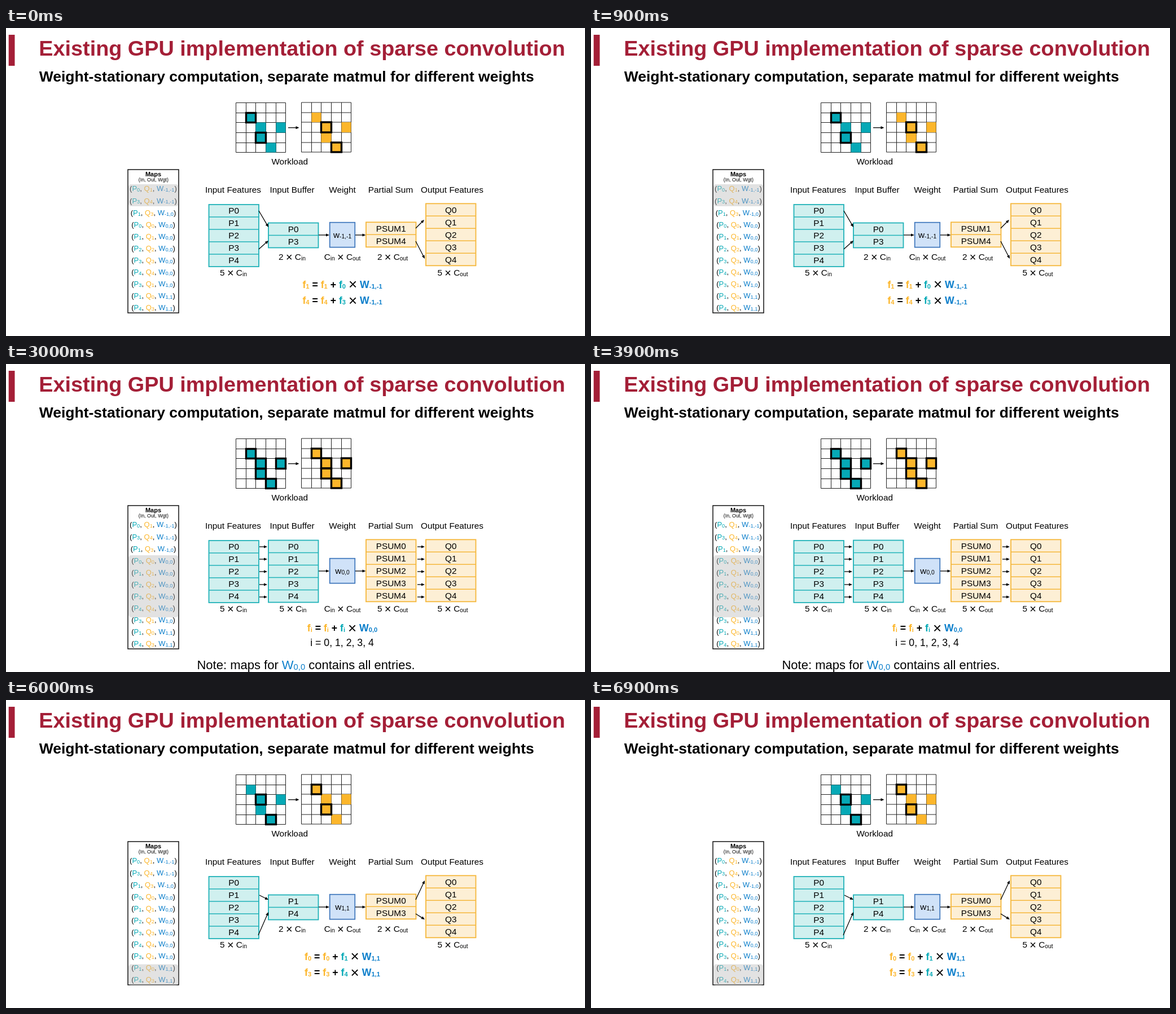
An HTML page with a canvas that plays this animation: 1026 px wide and 546 px high, repeating every 7.5 s.

```html
<!DOCTYPE html>
<html lang="en">
<head>
<meta charset="utf-8">
<title>Sparse convolution</title>
<style>
html, body { margin: 0; width: 100%; height: 100%; overflow: hidden; background: #fff; }
canvas { display: block; }
</style>
</head>
<body>
<canvas id="stage" width="1026" height="546"></canvas>
<script>
const ctx = document.getElementById('stage').getContext('2d');
const FAMILY = '"Liberation Sans", Arial, sans-serif';
const RED = '#a41f37', BLACK = '#000', TEAL = '#06a9b6', ORANGE = '#fcb62b', BLUE = '#0c7fcb';
const TEAL_BOX = { fill: '#d0f0ef', line: '#20b2b8' };
const ORANGE_BOX = { fill: '#fdefd5', line: '#f5b73b' };
const BLUE_BOX = { fill: '#d0e2f8', line: '#3c75bb' };
const LABEL = 15.36;
const ROW = 22;
const STEP_MS = 1500;

// Cell positions of the five points: [column, row]
const POINTS = [[1, 1], [2, 2], [4, 2], [2, 3], [3, 4]];

// Each map entry: [input, output, weight]
const MAPS = [
  [0, 1, '-1,-1'], [3, 4, '-1,-1'], [1, 3, '-1,0'],
  [0, 0, '0,0'], [1, 1, '0,0'], [2, 2, '0,0'], [3, 3, '0,0'], [4, 4, '0,0'],
  [3, 1, '1,0'], [1, 0, '1,1'], [4, 3, '1,1']
];

const rows = [324, 346, 368, 391, 413];
const STEPS = [
  { from: 0, to: 2, shade: [277, 316],
    arrows: [[448, 324, 465, 353], [448, 392, 465, 377], [726, 355, 741, 340], [726, 378, 742, 409]] },
  { from: 2, to: 3, shade: [317.5, 338],
    arrows: [[447, 343, 466, 354], [727, 378, 746, 388]] },
  { from: 3, to: 8, shade: [339, 449],
    arrows: rows.flatMap(y => [[449, y, 463, y], [729, y, 742, y]]) },
  { from: 8, to: 9, shade: [443.5, 464],
    arrows: [[447, 391, 466, 366], [727, 355, 742, 340]] },
  { from: 9, to: 11, shade: [468.5, 506],
    arrows: [[449, 346, 465, 354], [447, 417, 465, 376], [726, 354, 742, 320], [726, 379, 742, 389]] }
];

function text(str, x, y, size, { bold = false, color = BLACK, align = 'center' } = {}) {
  ctx.font = `${bold ? 'bold ' : ''}${size}px ${FAMILY}`;
  ctx.fillStyle = color;
  ctx.textAlign = align;
  ctx.fillText(str, x, y);
}

// Runs are [string, color, role]; role is 'sub', 'times' or empty.
const plain = str => [str, BLACK];
const times = ['×', BLACK, 'times'];
const indexed = (name, index, color) => [[name, color], [String(index), color, 'sub']];

function rich(runs, cx, y, size, { bold = false, sub = 0.67, cross = 1.3 } = {}) {
  const scale = { sub, times: cross };
  const parts = runs.map(([str, color, role]) => {
    const px = size * (scale[role] || 1);
    const heavy = bold && role !== 'times';
    ctx.font = `${heavy ? 'bold ' : ''}${px}px ${FAMILY}`;
    const drop = role === 'sub' ? size * 0.07 : role === 'times' ? (px - size) * 0.34 : 0;
    return { str, color, px, heavy, drop, width: ctx.measureText(str).width };
  });
  let x = cx - parts.reduce((sum, p) => sum + p.width, 0) / 2;
  for (const p of parts) {
    text(p.str, x, y + p.drop, p.px, { bold: p.heavy, color: p.color, align: 'left' });
    x += p.width;
  }
}

function line(x1, y1, x2, y2, color, width) {
  ctx.strokeStyle = color;
  ctx.lineWidth = width;
  ctx.beginPath();
  ctx.moveTo(x1, y1);
  ctx.lineTo(x2, y2);
  ctx.stroke();
}

function box(x, y, width, height, { fill, line }, weight) {
  ctx.fillStyle = fill;
  ctx.fillRect(x, y, width, height);
  ctx.strokeStyle = line;
  ctx.lineWidth = weight;
  ctx.strokeRect(x, y, width, height);
}

function arrow(x1, y1, x2, y2) {
  const head = 6, half = 2.6;
  const length = Math.hypot(x2 - x1, y2 - y1);
  ctx.save();
  ctx.translate(x1, y1);
  ctx.rotate(Math.atan2(y2 - y1, x2 - x1));
  line(0, 0, length - head + 1, 0, BLACK, 1.3);
  ctx.fillStyle = BLACK;
  ctx.beginPath();
  ctx.moveTo(length, 0);
  ctx.lineTo(length - head, -half);
  ctx.lineTo(length - head, half);
  ctx.fill();
  ctx.restore();
}

function table(x, y, width, names, style) {
  box(x, y, width, names.length * ROW, style, 1.8);
  names.forEach((name, i) => {
    if (i) line(x, y + i * ROW, x + width, y + i * ROW, style.line, 1.5);
    text(name, x + width / 2, y + i * ROW + 16.3, LABEL);
  });
}

function grid(x, y, color, active) {
  const edge = i => Math.round(i * 17.65);
  for (let i = 0; i <= 5; i++) {
    line(x + edge(i), y, x + edge(i), y + edge(5), '#222', 1);
    line(x, y + edge(i), x + edge(5), y + edge(i), '#222', 1);
  }
  const cell = ([c, r]) => [x + edge(c), y + edge(r), edge(c + 1) - edge(c), edge(r + 1) - edge(r)];
  ctx.fillStyle = color;
  for (const point of POINTS) ctx.fillRect(...cell(point));
  ctx.strokeStyle = BLACK;
  ctx.lineWidth = 3.4;
  for (const i of active) ctx.strokeRect(...cell(POINTS[i]));
}

function mapList([top, bottom]) {
  ctx.strokeStyle = '#111';
  ctx.lineWidth = 1.5;
  ctx.strokeRect(216, 251, 90, 254);
  text('Maps', 261, 263, 11, { bold: true });
  text('(In, Out, Wgt)', 261.3, 271.7, 8.85);
  MAPS.forEach(([p, q, w], i) => {
    rich([plain('('), ...indexed('P', p, TEAL), plain(', '), ...indexed('Q', q, ORANGE),
      plain(', '), ...indexed('W', w, BLUE), plain(')')], 261, 289.4 + i * 21.1, 13, { sub: 0.72 });
  });
  ctx.fillStyle = 'rgba(182, 182, 182, 0.4)';
  ctx.beginPath();
  ctx.roundRect(217, top, 88.5, bottom - top, 5);
  ctx.fill();
}

function formulas(entries) {
  const style = { bold: true, sub: 0.63, cross: 1.47 };
  const formula = ([p, q, w], y) => rich([
    ...indexed('f', q, ORANGE), plain(' = '), ...indexed('f', q, ORANGE), plain(' + '),
    ...indexed('f', p, TEAL), plain(' '), times, plain(' '), ...indexed('W', w, BLUE)
  ], 596, y, 17.7, style);
  if (entries.length < 5) {
    entries.forEach((entry, i) => formula(entry, 460.5 + i * 28.6));
    return;
  }
  formula(['i', 'i', '0,0'], 474);
  text('i = 0, 1, 2, 3, 4', 595.5, 500, 17.7);
  rich([plain('Note: maps for '), ...indexed('W', '0,0', BLUE), plain(' contains all entries.')],
    531.5, 540.5, 22);
}

function pipeline(entries, arrows) {
  const count = entries.length;
  const all = [0, 1, 2, 3, 4];
  const shapeY = count === 5 ? 439 : 411.3;
  const inset = count === 1 ? 1.5 : 0;
  const shape = (n, sub) => [plain(n + ' '), times, plain(' C'), [sub, BLACK, 'sub']];

  text('Input Features', 402.5, 291.7, LABEL);
  text('Input Buffer', 507, 291.7, LABEL);
  text('Weight', 596, 291.7, LABEL);
  text('Partial Sum', 681.5, 291.7, LABEL);
  text('Output Features', 790.5, 291.7, LABEL);

  table(359.5, 313, 88.5, all.map(i => 'P' + i), TEAL_BOX);
  table(465 + inset, 367.5 - count * ROW / 2, 88.5, entries.map(e => 'P' + e[0]), TEAL_BOX);
  table(638 + inset * 2, 366.3 - count * ROW / 2, 88.5, entries.map(e => 'PSUM' + e[1]), ORANGE_BOX);
  table(744, 311.3, 88.5, all.map(i => 'Q' + i), ORANGE_BOX);

  box(573.7, 344.7, 44.6, 44, BLUE_BOX, 1.7);
  rich(indexed('w', entries[0][2], BLACK), 596, 371.8, LABEL);

  rich(shape(5, 'in'), 403, 439, LABEL);
  rich(shape(count, 'in'), count === 5 ? 508.5 : 507, shapeY, LABEL);
  rich([plain('C'), ['in', BLACK, 'sub'], plain(' '), times, plain(' C'), ['out', BLACK, 'sub']],
    596, shapeY, LABEL);
  rich(shape(count, 'out'), 685, shapeY, LABEL);
  rich(shape(5, 'out'), 791.5, 439, LABEL);

  arrow(554, 367, 573, 367);
  arrow(619, 367, 637.5, 367);
  arrows.forEach(a => arrow(...a));
}

function draw(step) {
  const entries = MAPS.slice(step.from, step.to);
  ctx.fillStyle = '#fff';
  ctx.fillRect(0, 0, 1026, 546);
  ctx.fillStyle = RED;
  ctx.fillRect(4.7, 12, 10.8, 55);
  text('Existing GPU implementation of sparse convolution', 58.3, 49, 37.8,
    { bold: true, color: RED, align: 'left' });
  text('Weight-stationary computation, separate matmul for different weights', 58.7, 95, 26.5,
    { bold: true, align: 'left' });

  grid(407.5, 132.5, TEAL, entries.map(e => e[0]));
  grid(523.5, 132, ORANGE, entries.map(e => e[1]));
  arrow(500, 176.7, 519.5, 176.7);
  text('Workload', 502.7, 242.2, LABEL);

  mapList(step.shade);
  pipeline(entries, step.arrows);
  formulas(entries);
}

const start = performance.now();
function tick() {
  const elapsed = performance.now() - start;
  draw(STEPS[Math.floor(elapsed / STEP_MS) % STEPS.length]);
  requestAnimationFrame(tick);
}
tick();
</script>
</body>
</html>
```
